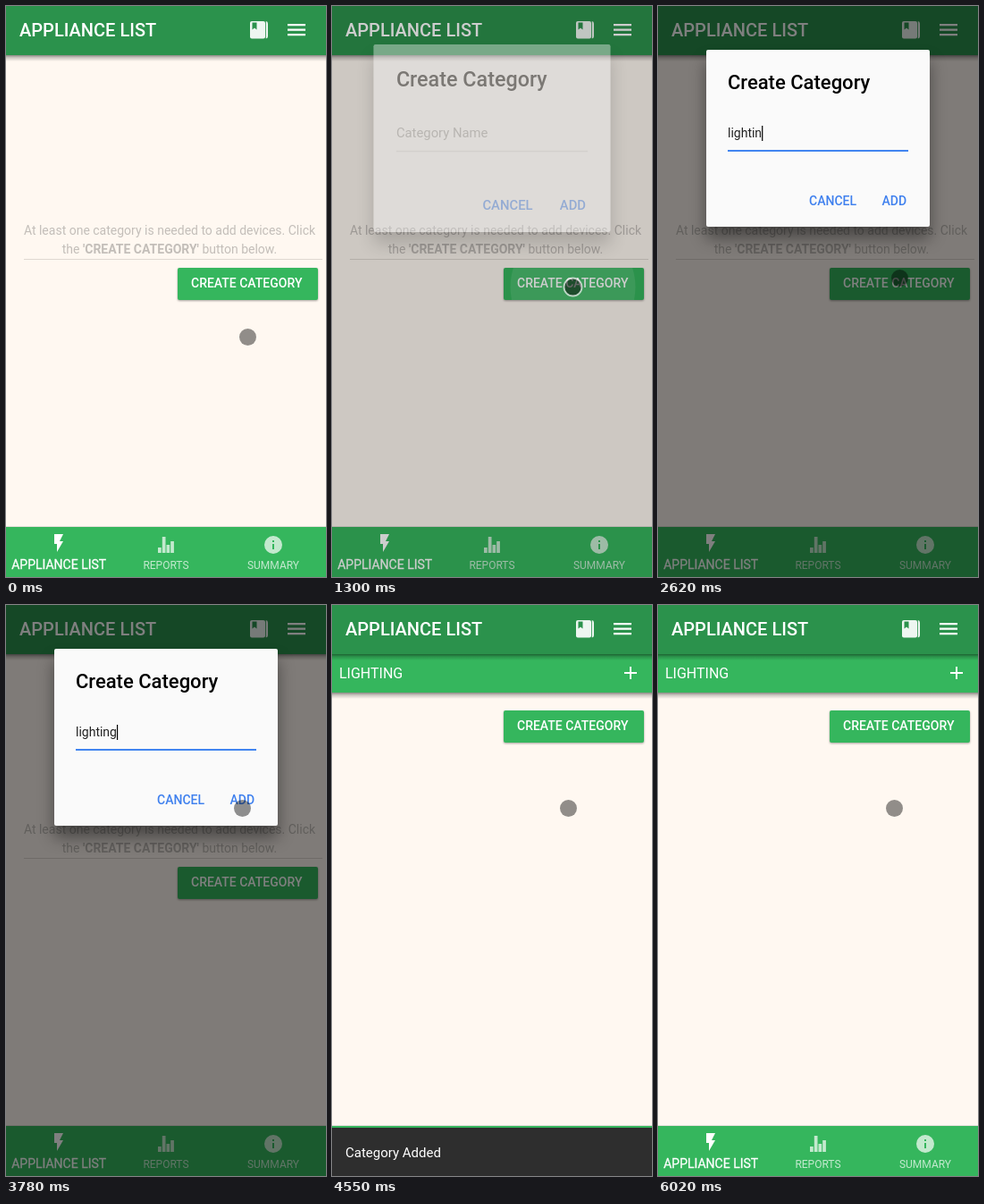
Write an HTML page that moves like this. It is 358 px wide and 639 px high and loops after 6100 ms.

```html
<!DOCTYPE html>
<html lang="en">
<head>
<meta charset="utf-8">
<title>Appliance list</title>
<style>
  html, body { margin: 0; width: 100%; height: 100%; overflow: hidden; background: #fff8f1; }
  svg { display: block; width: 100vw; height: 100vh; }
  text { font-family: Roboto, sans-serif; font-size: 14px; fill: #fff; white-space: pre; }
  .mid { font-weight: 500; }
  .note { fill: #c3beb9; text-anchor: middle; }
  .note tspan { font-weight: 700; }
  .tab { font-size: 12px; text-anchor: middle; }
  .off { opacity: .7; }
  .blue { fill: #3f80ee; font-weight: 500; }
  .raised { filter: drop-shadow(0 1.5px 1.2px rgba(0,0,0,.35)); }
  .deep { filter: drop-shadow(0 13px 9px rgba(0,0,0,.42)); }
</style>
</head>
<body>
<svg viewBox="0 0 358 639">
  <defs>
    <linearGradient id="fall" x1="0" y1="0" x2="0" y2="1">
      <stop offset="0" stop-color="#000" stop-opacity=".45"/>
      <stop offset=".4" stop-color="#000" stop-opacity=".2"/>
      <stop offset="1" stop-color="#000" stop-opacity="0"/>
    </linearGradient>
    <clipPath id="btnClip"><rect x="192" y="293" width="157" height="36" rx="2"/></clipPath>
    <clipPath id="addClip"><rect x="241" y="200" width="47" height="38" rx="2"/></clipPath>
  </defs>
  <rect width="358" height="639" fill="#fff8f1"/>

  <g id="empty">
    <text class="note" x="183" y="256">At least one category is needed to add devices. Click</text>
    <text class="note" x="183" y="277">the <tspan>'CREATE CATEGORY'</tspan> button below.</text>
    <rect x="20" y="283" width="334" height="1" fill="#dfd8d1"/>
  </g>

  <g id="list">
    <rect y="98" width="358" height="7" fill="url(#fall)"/>
    <rect y="55" width="358" height="43" fill="#35b65d"/>
    <text x="8" y="82" style="font-size:16px">LIGHTING</text>
    <path d="M327 76h14M334 69v14" stroke="#fff" stroke-width="2"/>
  </g>

  <g id="create">
    <rect class="raised" x="192" y="293" width="157" height="36" rx="2" fill="#35b65d"/>
    <circle id="btnRipple" cx="269.5" cy="314.5" r="70" fill="#fff" opacity=".1" clip-path="url(#btnClip)"/>
    <text class="mid" x="207" y="315">CREATE CATEGORY</text>
  </g>

  <rect y="55" width="358" height="7" fill="url(#fall)"/>
  <rect width="358" height="55" fill="#2b924c"/>
  <text class="mid" x="15" y="34" style="font-size:20px">APPLIANCE LIST</text>
  <g fill="#fff" opacity=".92">
    <rect x="273" y="17" width="17" height="19.5" rx="2"/>
    <path d="M275.5 18.5h5v8l-2.5-2-2.5 2z" fill="#2b924c"/>
    <path d="M290.8 17q2.2.3 2.2 2.5v14.500q0 2.200-2.200 2.500z"/>
  </g>
  <path d="M315 21.200h20M315 26.700h20M315 32.200h20" stroke="#fff" stroke-width="2.200"/>

  <rect y="582" width="358" height="1" fill="#000" opacity=".1"/>
  <rect y="583" width="358" height="56" fill="#35b65d"/>
  <path d="M54 591v11h3v9l7-12h-4l4-8z" fill="#fff"/>
  <text class="tab" x="59.200" y="630" style="font-size:14px" stroke="#fff" stroke-width=".3">APPLIANCE LIST</text>
  <g class="off">
    <path d="M170 606h3.700v6h-3.700zM174.800 594h3.700v18h-3.700zM179.500 603h3.700v9h-3.700zM184.200 599h3.700v13h-3.700z" fill="#fff"/>
    <text class="tab" x="179" y="630">REPORTS</text>
    <path fill-rule="evenodd" d="M289 603a10 10 0 1 0 20 0a10 10 0 1 0-20 0zM298 598h2v2h-2zM298 602h2v6h-2z" fill="#fff"/>
    <text class="tab" x="299" y="630">SUMMARY</text>
  </g>

  <rect id="shade" width="358" height="639"/>

  <g id="dialog">
    <rect class="deep" x="54" y="49" width="250" height="198" rx="2" fill="#fafafa"/>
    <text class="mid" x="78" y="93" style="font-size:22px;fill:#000">Create Category</text>
    <text id="hint" x="78" y="147" style="fill:#999">Category Name</text>
    <text id="typed" x="78" y="147" style="fill:#222"></text>
    <rect id="caret" y="134" width="1.200" height="17"/>
    <rect id="rule" x="78" y="161" width="202"/>
    <g id="addRipple" clip-path="url(#addClip)">
      <rect x="241" y="200" width="47" height="38" opacity=".12"/>
      <circle cx="266" cy="229" r="23" opacity=".14"/>
    </g>
    <text class="blue" x="169" y="223">CANCEL</text>
    <text class="blue" x="250.500" y="223">ADD</text>
  </g>

  <g id="toast">
    <rect y="585" width="358" height="54" fill="#2e2e2e"/>
    <text x="15" y="618" style="font-size:15px">Category Added</text>
  </g>

  <circle id="pointer"/>
</svg>
<script>
const LOOP = 6100;
const ui = {};
document.querySelectorAll('svg [id]').forEach(el => ui[el.id] = el);

const set = (el, attrs) => { for (const k in attrs) el.setAttribute(k, attrs[k]); };
const show = (el, on) => { el.style.display = on ? '' : 'none'; };
const clamp = v => Math.max(0, Math.min(1, v));
const smooth = v => { v = clamp(v); return v * v * (3 - 2 * v); };
const within = (t, a, b) => t >= a && t < b;

// How many of n even steps, the first at a and the last at b, have happened.
function steps(t, a, b, n) {
  if (t < a) return 0;
  const gap = n > 1 ? (b - a) / (n - 1) : 1;
  return Math.min(n, 1 + Math.floor((t - a) / gap + .05));
}

// start, end, steps, target x, target y
const moves = [
  [300, 690, 6, 269.5, 314.5],
  [1450, 1530, 2, 262, 146],
  [1840, 1990, 3, 270.5, 304.5],
  [3230, 3230, 1, 265.5, 330],
  [3400, 3780, 6, 264.5, 227.5]
];
const word = 'lighting';
const keyTimes = [1920, 1990, 2150, 2210, 2380, 2450, 2620, 2770];

function drawPointer(t) {
  let x = 270.5, y = 370.5;
  for (const [a, b, n, tx, ty] of moves) {
    const p = smooth(steps(t, a, b, n) / n);
    x += (tx - x) * p;
    y += (ty - y) * p;
  }
  const pressed = within(t, 690, 1450) || within(t, 4160, 4390);
  set(ui.pointer, {
    cx: x, cy: y, r: pressed ? 10 : 9.5,
    'fill-opacity': pressed ? .5 : .43,
    stroke: pressed ? 'rgba(255,255,255,.68)' : 'none',
    'stroke-width': 1.8
  });
}

function drawDialog(t) {
  const opening = steps(t, 1220, 1530, 5), closing = steps(t, 4160, 4550, 6);
  const come = smooth((opening - 1) * .43), go = smooth((closing - 1) * .4);
  const alpha = opening ? Math.max(.01, come) * (1 - go) : 0;
  const scale = 1.1 - .1 * come - .1 * go;
  set(ui.shade, { opacity: alpha / 2 });
  set(ui.dialog, {
    opacity: alpha,
    transform: `translate(179 148) scale(${scale}) translate(-179 -148)`
  });
  show(ui.dialog, alpha > 0);

  const focused = within(t, 1840, 4160);
  const count = keyTimes.filter(k => t >= k).length;
  ui.typed.textContent = word.slice(0, count);
  show(ui.hint, count === 0);
  show(ui.caret, focused && !within(t, 3230, 3760));
  if (focused) set(ui.caret, { x: 78 + (count ? ui.typed.getComputedTextLength() : 0) });
  set(ui.rule, { height: focused ? 2 : 1.5, fill: focused ? '#4285f0' : '#dedede' });
  show(ui.addRipple, closing > 0);
  show(ui.btnRipple, within(t, 1300, 1530));
}

function drawToast(t) {
  const glide = k => k ? Math.pow(1 - (k - .6) / 5.4, 3) : 1;
  const enter = glide(steps(t, 4160, 4550, 6));
  const leave = 1 - glide(steps(t, 5640, 6020, 6));
  set(ui.toast, { transform: `translate(0 ${54 * (enter + leave)})` });
  show(ui.toast, enter + leave < 1);
}

function draw(t) {
  const added = t >= 4160;
  show(ui.empty, !added);
  show(ui.list, added);
  set(ui.create, { transform: `translate(0 ${added ? -175 : 0})` });
  drawDialog(t);
  drawToast(t);
  drawPointer(t);
}

const begin = performance.now();
function tick() {
  draw((performance.now() - begin) % LOOP);
  requestAnimationFrame(tick);
}
tick();
</script>
</body>
</html>
```
